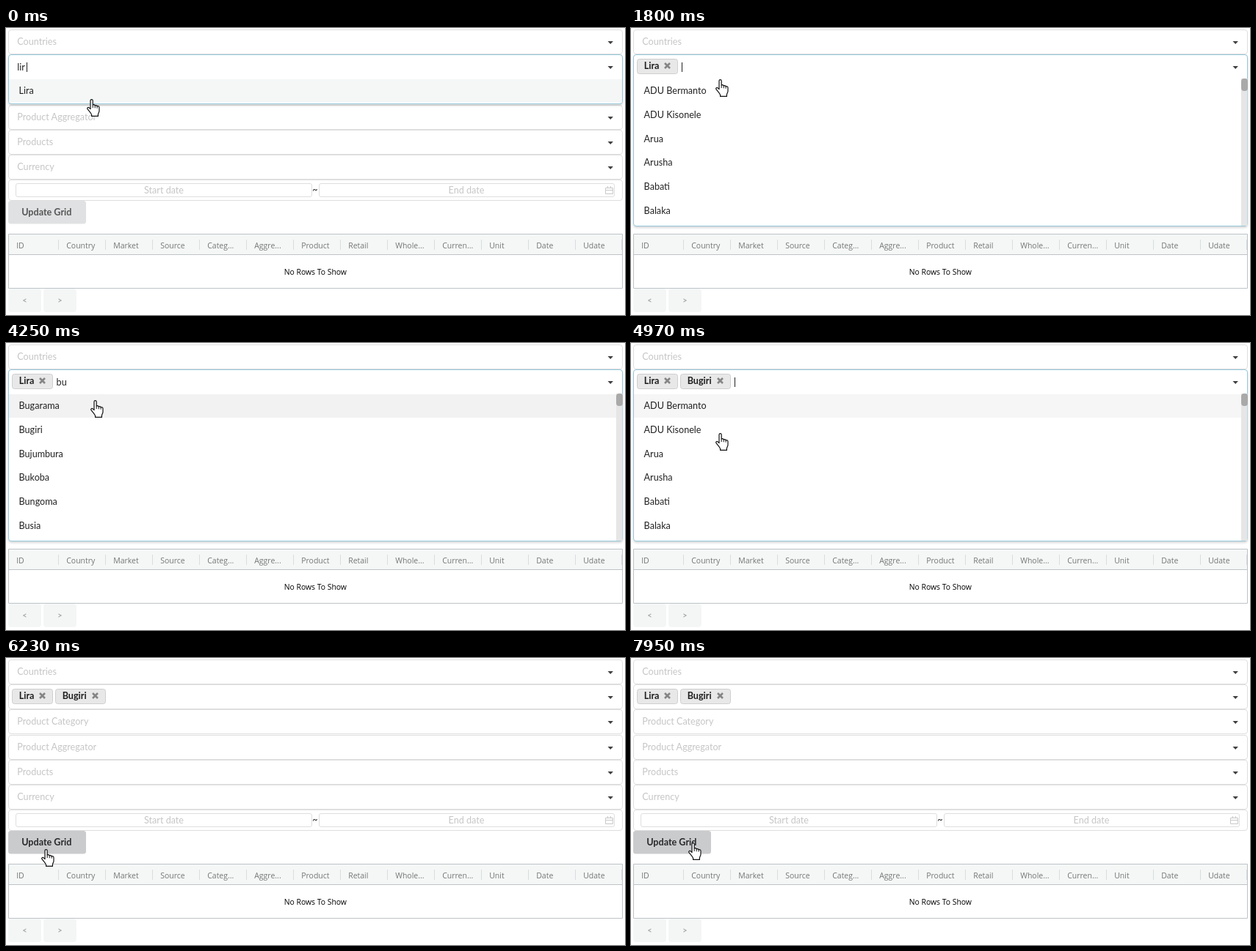
These frames come from a looping animation (843x392 px, 8 s). An HTML page:

```html
<!DOCTYPE html>
<html lang="en">
<head>
<meta charset="utf-8">
<title>Grid filters</title>
<style>
html, body { margin: 0; width: 100%; height: 100%; overflow: hidden; background: #fff; }
svg { display: block; width: 843px; height: 392px; font: 12.6px Lato, sans-serif; fill: rgba(0,0,0,.87); }
.box { fill: #fff; stroke: #dededf; }
.open { fill: #fff; stroke: #96c8da; filter: drop-shadow(0 2px 1.5px rgba(34,36,38,.18)); }
.hint { fill: #c6c6c6; }
.mid { text-anchor: middle; }
.bold { font-weight: 700; }
.arrow { fill: #404040; }
.chip { fill: #e8e8e8; stroke: #cfcfd0; }
.cross { stroke: #858585; stroke-width: 2.6; fill: none; }
.grid { font: 10.5px "Open Sans", "Noto Sans", sans-serif; }
.head { fill: #757575; }
.pager { fill: #f4f6f6; }
.icon { fill: none; stroke: #c8c8c8; }

/* Each part holds its state until the next key: 1% = 80 ms */
.lira, .lists, .all, .b, .bu, .chip1, .chip2, .caret, .row1, .row2, .btn, .label, .hand {
  animation: 8s step-end infinite;
}
.lira  { animation-name: lira; }
.lists { animation-name: lists; }
.all   { animation-name: all; }
.b     { animation-name: b; }
.bu    { animation-name: bu; }
.chip1 { animation-name: chip1; }
.chip2 { animation-name: chip2; }
.caret { animation-name: caret; }
.row1  { animation-name: row1; }
.row2  { animation-name: row2; }
.btn   { animation-name: btn; }
.label { animation-name: label; }
.hand  { animation-name: hand; }

@keyframes lira  { 0% { visibility: visible } 15%, 100% { visibility: hidden } }
@keyframes lists { 0%, 73% { visibility: hidden } 15% { visibility: visible } }
@keyframes all   { 0%, 30%, 73% { visibility: hidden } 15%, 57.5% { visibility: visible } }
@keyframes b     { 0%, 40.125% { visibility: hidden } 30% { visibility: visible } }
@keyframes bu    { 0%, 57.5% { visibility: hidden } 40.125% { visibility: visible } }
@keyframes chip1 { 0% { visibility: hidden } 15%, 100% { visibility: visible } }
@keyframes chip2 { 0% { visibility: hidden } 57.5%, 100% { visibility: visible } }
@keyframes row1  { 0% { fill: transparent } 30% { fill: #f2f2f2 } 54.6% { fill: #f6f6f6 } 73%, 100% { fill: transparent } }
@keyframes row2  { 0%, 57.5%, 100% { fill: transparent } 54.6% { fill: #f2f2f2 } }
@keyframes btn   { 0% { fill: #e0e1e2 } 76%, 100% { fill: #cacbcd } }
@keyframes label { 0% { fill: rgba(0,0,0,.62) } 76%, 100% { fill: rgba(0,0,0,.8) } }
@keyframes caret {
  0% { transform: translateX(28px); opacity: 1 }
  1.5%, 25.4%, 36.25%, 45.375%, 66.625%, 100% { opacity: 0 }
  18.75% { transform: translateX(69px); opacity: 1 }
  30% { transform: translateX(76px); opacity: 1 }
  40.125% { transform: translateX(83px); opacity: 1 }
  57.5% { transform: translateX(141px); opacity: 1 }
}
@keyframes hand {
  0% { transform: translate(110px, 97px) }
  1.5% { transform: translate(109px, 96px) }
  5.25% { transform: translate(108px, 92px) }
  6.75% { transform: translate(106px, 87px) }
  8.5% { transform: translate(104px, 82px) }
  10.125% { transform: translate(104px, 79px) }
  11.625% { transform: translate(104px, 78px) }
  13.5% { transform: translate(106px, 76px) }
  16.875% { transform: translate(111px, 72px) }
  18.75% { transform: translate(114px, 70px) }
  22.5% { transform: translate(115px, 70px) }
  30.875% { transform: translate(115px, 73px) }
  53.125% { transform: translate(115px, 78px) }
  54.6% { transform: translate(115px, 100px) }
  56% { transform: translate(115px, 118px) }
  57.5% { transform: translate(115px, 123px) }
  65.125% { transform: translate(115px, 130px) }
  66.625% { transform: translate(105px, 190px) }
  68.125% { transform: translate(70px, 270px) }
  69.625% { transform: translate(46px, 311px) }
  74.5% { transform: translate(47px, 290px) }
  76% { transform: translate(48px, 266px) }
  77.875% { transform: translate(48px, 261px) }
  87.125% { transform: translate(53px, 257px) }
  89% { transform: translate(60px, 250px) }
  91% { transform: translate(65px, 246px) }
  96% { transform: translate(68px, 247px) }
  97.75% { transform: translate(74px, 250px) }
  99.375%, 100% { transform: translate(78px, 252px) }
}
</style>
</head>
<body>
<svg id="stage" viewBox="0 0 843 392"></svg>
<script>
const text = (x, y, s, cls = '') => `<text x="${x}" y="${y}" class="${cls}">${s}</text>`;
const rect = (x, y, w, h, cls, r = 0) =>
  `<rect x="${x}" y="${y}" width="${w}" height="${h}" rx="${r}" class="${cls}"/>`;
const group = (cls, ...parts) => `<g class="${cls}">${parts.join('')}</g>`;

const arrow = y => `<path class="arrow" d="M819.5 ${y + 16}h7.4l-3.7 4z"/>`;
const field = (y, hint) =>
  rect(3.5, y + .5, 836, 33, 'box', 3.5) + text(15.3, y + 21, hint, 'hint') + arrow(y);

const rows = names => names.map((s, i) => text(17.6, 90 + i * 32.75, s)).join('');

const chip = (x, w, s) => rect(x + .5, 42.5, w - 1, 20, 'chip', 3) +
  text(x + 9.7, 56, s, 'bold') +
  `<path class="cross" d="M${x + w - 18} 48l7 7m0-7l-7 7"/>`;

const fields = [[2, 'Countries'], [36, ''], [70, 'Product Category'],
  [105, 'Product Aggregator'], [139, 'Products'], [173, 'Currency']];

const dates = rect(3.5, 207.5, 836, 28, 'box', 3.5) +
  rect(13.5, 212.5, 403, 18, 'box', 2.5) + rect(426.5, 212.5, 402, 18, 'box', 2.5) +
  text(215, 226, 'Start date', 'hint mid') + text(627, 226, 'End date', 'hint mid') +
  text(421, 225, '~', 'mid') +
  '<path class="icon" d="M816.5 218.5h10v8h-10zM816 221.5h11M819.5 216v3M823.5 216v3"/>';

const columns = ['Country', 'Market', 'Source', 'Categ...', 'Aggre...', 'Product',
  'Retail', 'Whole...', 'Curren...', 'Unit', 'Date', 'Udate'];
const grid = group('grid',
  '<path fill="#f5f7f7" d="M3 281h837v29H3z"/>',
  '<path fill="none" stroke="#bdc3c7" d="M3.5 281.5h836v74H3.5zM3 309.5h837"/>',
  text(14.2, 301, 'ID', 'head'),
  ...columns.map((s, i) => text(82.2 + i * 64, 301, s, 'head')),
  ...Array.from({ length: 13 }, (_, i) =>
    `<path stroke="#d9dddf" d="M${i < 12 ? 71.5 + i * 64 : 838.5} 289v14"/>`),
  `<text x="421.3" y="337" class="mid" font-size="10.4" style="font-size:10.4px;fill:#000">No Rows To Show</text>`);

const pager = (x, s) => rect(x, 356, 45, 32, 'pager', 4) +
  `<text x="${x + 22.5}" y="375.5" class="mid bold" style="font-size:11px;fill:#a5a6a6">${s}</text>`;

const lira = group('lira',
  rect(3.5, 36.5, 836, 67, 'open', 3.5),
  '<path fill="#f5f7f7" d="M4 70h835v32H4z"/>',
  text(15.3, 57.5, 'lir'), rows(['Lira']), arrow(36));

const lists = group('lists',
  rect(3.5, 36.5, 836, 234, 'open', 3.5),
  rect(4, 70, 827, 32, 'row1'), rect(4, 103, 827, 32, 'row2'),
  '<path fill="#e6e6e6" d="M831 69h8.5v201h-8.5z"/>',
  '<rect x="831" y="69" width="9" height="17" rx="4" fill="#a9a9a9"/>',
  arrow(36)) +
  group('all', rows(['ADU Bermanto', 'ADU Kisonele', 'Arua', 'Arusha', 'Babati', 'Balaka'])) +
  group('b', text(68.6, 57.5, 'b'),
    rows(['ADU Bermanto', 'Babati', 'Balaka', 'Base', 'Birambo', 'Bugarama'])) +
  group('bu', text(68.6, 57.5, 'bu'),
    rows(['Bugarama', 'Bugiri', 'Bujumbura', 'Bukoba', 'Bungoma', 'Busia']));

const hand = group('hand', `<path fill="#fff" stroke="#111" stroke-width="1.2" stroke-linejoin="round"
  d="M5 2.3Q5 .6 6.6 .6T8.2 2.3V8q1.6-.9 3 .8 1.7-.7 2.9 .9 2.9-.4 2.9 2V16c0 2.4-1.6 3-1.6 5.400v2H6.600v-2
  C5.600 19 3 16.500 1 13.600c-.9-1.600 .9-2.900 2.200-1.700L5 13.700z"/>
  <path fill="none" stroke="#111" d="M8.200 8v4M11.200 8.800v3.500M14.100 9.700v3"/>`);

document.getElementById('stage').innerHTML =
  fields.map(f => field(...f)).join('') + dates +
  rect(3, 236, 106, 31.6, 'btn', 3.6) + text(21.2, 255.700, 'Update Grid', 'bold label') +
  grid + pager(3, '&lt;') + pager(51, '&gt;') +
  lira + lists +
  group('chip1', chip(8, 56, 'Lira')) + group('chip2', chip(67, 69, 'Bugiri')) +
  rect(0, 47, 1, 13, 'caret') + hand;
</script>
</body>
</html>
```
